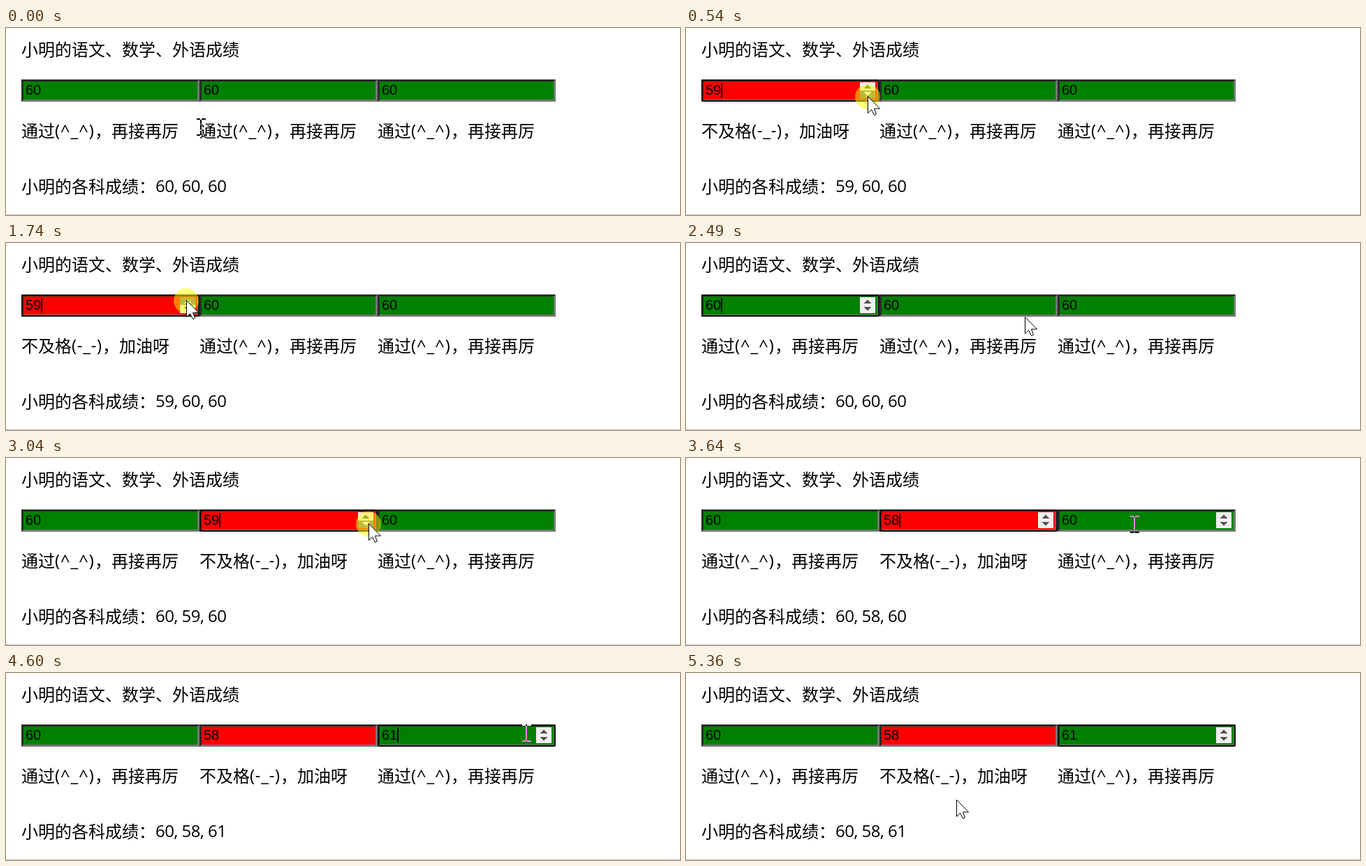
Recreate the animation shown at these times as an HTML page with a canvas. Size 965 by 269 pixels, loop 5.43 s.

```html
<!DOCTYPE html>
<html lang="zh-CN">
<head>
<meta charset="utf-8">
<title>成绩</title>
<style>
html, body { margin: 0; width: 100%; height: 100%; overflow: hidden; background: #fff; }
canvas { display: block; }
</style>
</head>
<body>
<canvas id="stage" width="965" height="269"></canvas>
<script>
const ctx = document.getElementById('stage').getContext('2d');
const LOOP = 5430, TICK = 70, BLINK = 530, PASS = 60;
const LEFT = 22, TOP = 74, WIDTH = 255, HEIGHT = 32;
const SUBJECTS = [0, 1, 2];
const CJK = '350 24px "Noto Sans CJK SC", "Noto Sans CJK", sans-serif';
const LATIN = '24px "Open Sans", "Noto Sans", sans-serif';
const INPUT = '20px "Liberation Sans", Arial, sans-serif';

// Each move glides evenly to its point in whole ticks, then rests.
const home = { x: 279, y: 143 };
const moves = [
  { at: 0, ticks: 3, x: 260, y: 98 },
  { at: 1330, ticks: 3, x: 258, y: 82 },
  { at: 2140, ticks: 5, x: 485, y: 106 },
  { at: 2490, ticks: 5, x: 519, y: 94 },
  { at: 3570, ticks: 1, x: 642, y: 96 },
  { at: 3640, ticks: 7, x: 768, y: 83 },
  { at: 4530, ticks: 1, x: 745, y: 87 },
  { at: 4600, ticks: 7, x: 407, y: 159 },
  { at: 5150, ticks: 3, x: 387, y: 182 }
];

// Press times per field; the upper half of a spinner adds, the lower subtracts.
const presses = [[540, 1000, 1740, 2080], [3040, 3310], [4210]];

const fieldX = i => LEFT + i * WIDTH;
const isUpper = p => p.y < 90;
const passed = score => score >= PASS;

function pointerAt(t) {
  let { x, y } = home;
  for (const m of moves) {
    if (t < m.at) break;
    const k = Math.min(1, Math.floor((t - m.at) / TICK) / m.ticks);
    x += (m.x - x) * k;
    y += (m.y - y) * k;
  }
  return { x: Math.round(x), y: Math.round(y) };
}

function stateAt(t) {
  const s = { scores: [], focus: -1, pressed: false, caret: false };
  presses.forEach((times, i) => {
    s.scores[i] = PASS;
    for (const at of times.filter(at => at <= t)) {
      s.scores[i] += isUpper(pointerAt(at)) ? 1 : -1;
      s.focus = i;
      s.pressed = t - at < TICK;
      s.caret = t - at < BLINK;
    }
  });
  return s;
}

function inside(p, x, y, w, h) {
  return p.x >= x && p.x < x + w && p.y >= y && p.y < y + h;
}

function rect(color, x, y, w, h) {
  ctx.fillStyle = color;
  ctx.fillRect(x, y, w, h);
}

function poly(color, points) {
  ctx.beginPath();
  points.forEach(([x, y]) => ctx.lineTo(x, y));
  ctx.closePath();
  ctx.fillStyle = color;
  ctx.fill();
}

function text(str, x, y, font, spacing = 0) {
  ctx.font = font;
  ctx.letterSpacing = spacing + 'px';
  ctx.fillStyle = '#000';
  ctx.fillText(str, x, y);
  return x + ctx.measureText(str).width;
}

function comment(x, ok) {
  const [head, face, tail] = ok ? ['通过', '(^_^)', '，再接再厉'] : ['不及格', '(-_-)', '，加油呀'];
  x = text(head, x, 157, CJK);
  x = text(face, x, 156, LATIN, ok ? 1.2 : 0.7);
  text(tail, x, 157, CJK);
}

function chevron(color, x, y, dir) {
  poly(color, [[x - 5.5, y], [x, y + 5.5 * dir], [x + 5.5, y]]);
}

function spinner(x, pressed, upper) {
  const tint = active => active ? '#fff' : '#505050';
  rect('#f0f0f0', x, 78, 22, 23);
  if (pressed) rect('#787878', x, upper ? 78 : 90, 22, 11);
  chevron(tint(pressed && upper), x + 11, 87, -1);
  chevron(tint(pressed && !upper), x + 11, 92, 1);
}

function bevel(x, y, w, h) {
  const lit = [[x + w, y], [x + w, y + h], [x, y + h]];
  const inner = [[x + 3, y + h - 3], [x + w - 3, y + h - 3], [x + w - 3, y + 3]];
  poly('#2b2b2b', [lit[2], [x, y], lit[0], inner[2], [x + 3, y + 3], inner[0]]);
  poly('#767676', [...lit, ...inner]);
}

function field(i, s, p) {
  const x = fieldX(i), focused = s.focus === i;
  rect(passed(s.scores[i]) ? '#008000' : '#ff0000', x, TOP, WIDTH, HEIGHT);
  bevel(x, TOP, WIDTH, HEIGHT);
  text(s.scores[i], x + 6, 96, INPUT);
  if (focused || inside(p, x, TOP, WIDTH, HEIGHT)) {
    spinner(x + 227, focused && s.pressed, isUpper(p));
  }
  if (focused && s.caret) rect('#000', x + 28, 79, 2, 21);
}

function focusRing(x) {
  ctx.strokeStyle = '#101010';
  ctx.lineWidth = 2;
  ctx.beginPath();
  ctx.roundRect(x + 1, TOP + 1, WIDTH - 2, HEIGHT - 2, 2.5);
  ctx.stroke();
}

function overText(p, scores) {
  return SUBJECTS.some(i => {
    const x = fieldX(i);
    const typing = inside(p, x, TOP, WIDTH, HEIGHT) && !inside(p, x + 227, 78, 22, 23);
    return typing || inside(p, x, 132, passed(scores[i]) ? 225 : 212, 32);
  });
}

function beam({ x, y }) {
  ctx.globalCompositeOperation = 'difference';
  rect('#fff', x - 1, y - 11, 2, 22);
  for (const edge of [y - 13, y + 10]) {
    rect('#fff', x - 6, edge, 5, 2);
    rect('#fff', x + 1, edge, 6, 2);
  }
  ctx.globalCompositeOperation = 'source-over';
}

function arrow({ x, y }) {
  const shape = [[0, 0], [0, 24], [5, 19], [9, 27], [12, 25.5], [9, 17.5], [17, 17.5]];
  poly('#fff', shape.map(([dx, dy]) => [x + dx + 0.5, y + dy + 0.5]));
  ctx.strokeStyle = '#000';
  ctx.lineWidth = 1;
  ctx.stroke();
}

function highlight({ x, y }) {
  ctx.beginPath();
  ctx.arc(x, y + 1, 18, 0, Math.PI * 2);
  ctx.fillStyle = 'rgba(255, 255, 0, 0.5)';
  ctx.fill();
}

function draw(t) {
  const s = stateAt(t), p = pointerAt(t);
  rect('#fff', 0, 0, 965, 269);
  rect('#c8c8c8', 0, 268, 965, 1);
  text('小明的语文、数学、外语成绩', LEFT, 40, CJK);
  for (const i of SUBJECTS) {
    field(i, s, p);
    comment(fieldX(i), passed(s.scores[i]));
  }
  if (s.focus >= 0) focusRing(fieldX(s.focus));
  const end = text('小明的各科成绩：', LEFT, 237, CJK);
  text(s.scores.join(', '), end, 236, LATIN, -0.5);
  if (s.pressed) highlight(p);
  if (overText(p, s.scores)) beam(p);
  else arrow(p);
}

const start = performance.now();
function loop() {
  draw((performance.now() - start) % LOOP);
  requestAnimationFrame(loop);
}
loop();
</script>
</body>
</html>
```
